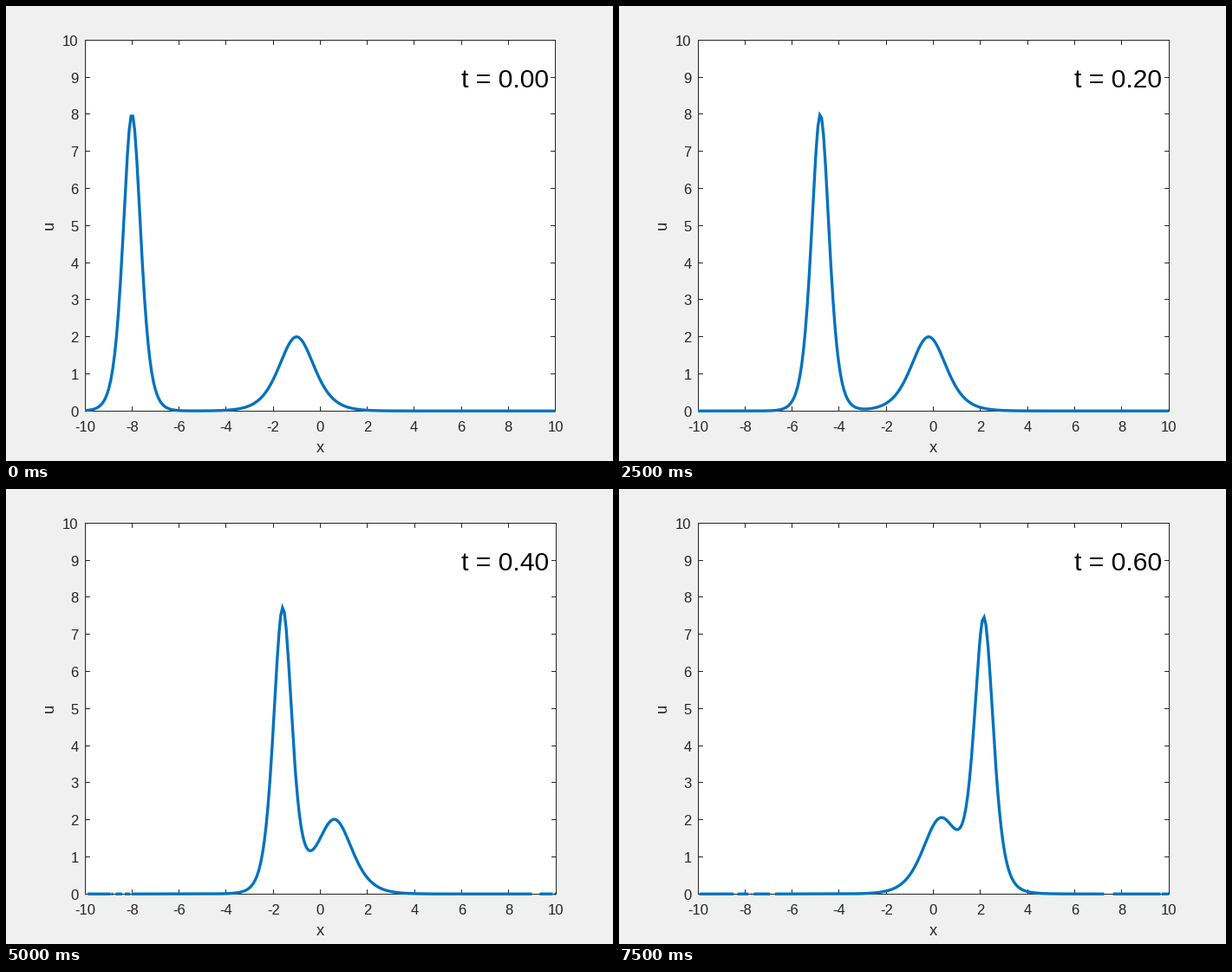
Write a matplotlib script that moves like this. It is 700 by 525 pixels and loops after 8 s.

```python
"""Two solitons of the Korteweg-de Vries equation passing through each other."""
import numpy as np
import matplotlib.pyplot as plt
from matplotlib.animation import FuncAnimation

W, H, DPI = 700, 525, 100
FRAMES, INTERVAL, DT = 16, 500, 0.04
LEFT, TOP, BOTTOM = 91, 39.375, 467.25
INK, BLUE = "#262626", "#0072BD"

x = np.linspace(-10, 10, 256)
fine = np.linspace(-10, 10, 255 * 8 + 1)


def pt(px):
    return px * 72 / DPI


def wave(t):
    """Exact two-soliton solution u = 2 (ln F)_xx, heights 8 and 2."""
    a = 4 * (x + 8 - 16 * t)
    b = 2 * (x + 1 + np.log(3) - 4 * t)
    slopes = np.array([[0], [4], [2], [6]])
    w = np.exp([0 * x, a, b, a + b - np.log(9)])
    w /= w.sum(axis=0)
    mean = (w * slopes).sum(axis=0)
    return 2 * (w * (slopes - mean) ** 2).sum(axis=0)


def ripple(i):
    """Faint numerical noise that makes the flat tails dip below zero."""
    raw = np.random.default_rng(i).normal(size=x.size)
    noise = np.convolve(raw, np.ones(3) / np.sqrt(3), "same")
    return 1.2e-4 + 1e-4 * min(1, i * DT / 0.3) * noise


plt.rcParams["font.family"] = "Liberation Sans"
plt.rcParams["axes.unicode_minus"] = False
fig = plt.figure(figsize=(W / DPI, H / DPI), dpi=DPI, facecolor="#f0f0f0")
ax = fig.add_axes([0, 0, 1, 1])


def crisp(v):
    """Centre of the pixel that holds v."""
    return np.floor(v) + 0.5


def segment(xs, ys):
    ax.plot(xs, ys, color=INK, lw=pt(1), snap=False,
            solid_capstyle="butt", zorder=2)


def label(px, py, text, size, color=INK, **kw):
    ax.text(px, py, text, fontsize=pt(size), color=color, va="baseline", **kw)


def draw(i):
    ax.clear()
    ax.set(xlim=(0, W), ylim=(H, 0))
    ax.axis("off")
    right = 633.5 if i == 0 else 634

    def X(v):
        return LEFT + (v + 10) * (right - LEFT) / 20

    def Y(v):
        return BOTTOM - v * (BOTTOM - TOP) / 10

    x0, x1, y0, y1 = crisp(np.array([LEFT, right, TOP, BOTTOM]))
    ax.fill([x0, x1, x1, x0], [y0, y0, y1, y1], facecolor="white",
            edgecolor=INK, lw=pt(1), snap=False, zorder=1)

    tick = 5.4
    for v in range(-10, 11, 2):
        px = crisp(X(v))
        segment([px, px], [y1, y1 - tick])
        segment([px, px], [y0, y0 + tick])
        label(X(v), 491, str(v), 16.67, ha="center")
    for v in range(11):
        py = crisp(Y(v))
        segment([x0, x0 + tick], [py, py])
        segment([x1, x1 - tick], [py, py])
        label(83.5, Y(v) + 6.5, str(v), 16.67, ha="right")

    label(362.5, 515, "x", 18.33, ha="center")
    label(55, (TOP + BOTTOM) / 2, "u", 18.33, ha="center",
          rotation=90, rotation_mode="anchor")
    label(525, 94, f"t = {i * DT:.2f}", 30, "black", ha="left")

    # parts below zero leave the plot
    u = np.interp(fine, x, wave(i * DT) + ripple(i))
    u[u < 0] = np.nan
    ax.plot(X(fine), Y(u), color=BLUE, lw=pt(3.33), zorder=3,
            solid_capstyle="butt", solid_joinstyle="miter")
    return []


anim = FuncAnimation(fig, draw, frames=FRAMES, interval=INTERVAL,
                     init_func=lambda: [], repeat=True, repeat_delay=0)
plt.show()
```
